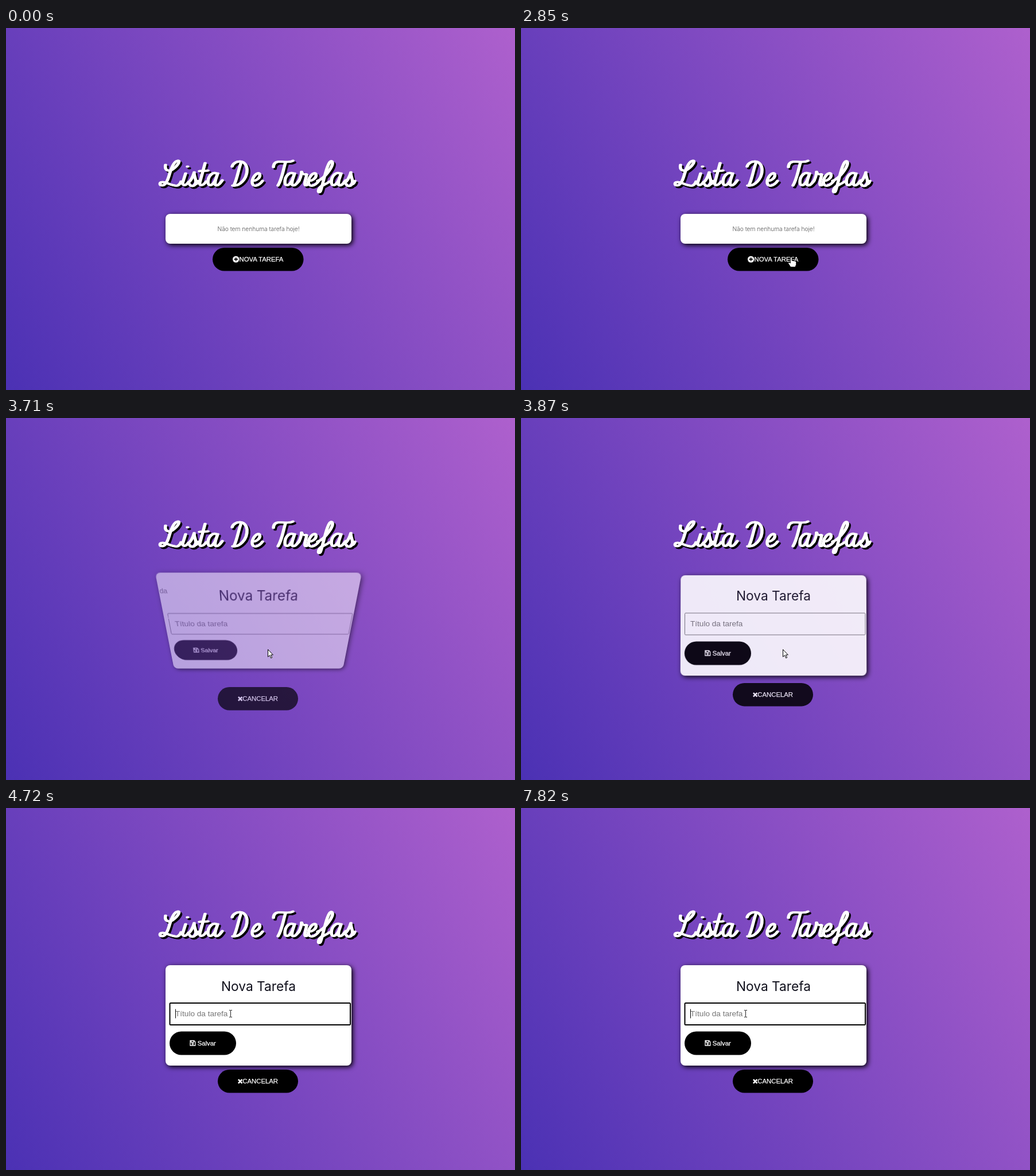
Write an HTML page that moves like this. It is 887 px wide and 631 px high and loops after 8000 ms.

```html
<!DOCTYPE html>
<html lang="pt">
<head>
<meta charset="utf-8">
<title>Lista De Tarefas</title>
<style>
html, body { margin: 0; width: 100%; height: 100%; overflow: hidden; }
body { background: linear-gradient(60deg, #4b31b4, #ae60cd); }
#stage { position: absolute; left: 0; top: 0; width: 887px; height: 631px; overflow: hidden; }
#stage > * { position: absolute; }
svg { display: block; }
.layer { left: 0; top: 0; overflow: visible; }
#title { fill: none; stroke: #fff; stroke-width: 3.6; stroke-linecap: round; stroke-linejoin: round;
  filter: drop-shadow(3.4px 3.4px 0 #000); }
.card { left: 278px; width: 324px; background: #fff; border-radius: 8px; box-shadow: 2.5px 2.5px 9px #000; }
#form { will-change: transform, opacity; }
text { font: 11.33px "Liberation Sans", Arial, sans-serif; fill: #fff; }
.label { stroke: #fff; stroke-width: .25; }
.head { font: 22.7px Inter, sans-serif; fill: #10101c; text-anchor: middle; }
.empty { font: 300 10.2px Inter, sans-serif; fill: #555; text-anchor: middle; }
.hint { font-size: 13.6px; fill: #757575; }
.line { fill: none; stroke: #fff; }
#cursor path { fill: #fff; stroke: #000; stroke-width: 1; stroke-linejoin: round; }
#cursor #ibeam { fill: none; stroke: #222; }
</style>
</head>
<body>
<div id="stage">
  <svg id="title" class="layer" width="887" height="631" role="img" aria-label="Lista De Tarefas"></svg>

  <div id="emptyCard" class="card" style="top:324px;height:52px">
    <svg width="324" height="52"><text class="empty" x="162" y="29.7">Não tem nenhuma tarefa hoje!</text></svg>
  </div>
  <svg id="add" class="layer" width="887" height="631">
    <rect x="360" y="383" width="158.5" height="40.5" rx="20.25"/>
    <circle cx="400.7" cy="403.1" r="5.7" fill="#fff"/>
    <path d="M397.5 403.1h6.4M400.7 399.9v6.4" stroke="#000" stroke-width="1.6"/>
    <text class="label" x="406.5" y="407.2">NOVA TAREFA</text>
  </svg>

  <div id="form" class="card" style="top:273.5px;height:175px">
    <svg width="324" height="175" viewBox="278 273.5 324 175">
      <text class="head" x="440" y="318">Nova Tarefa</text>
      <rect id="field" x="285.5" y="339.5" width="314.5" height="38" rx="1.5" fill="#fff"/>
      <text class="hint" x="295" y="362.4">Título da tarefa</text>
      <path id="caret" d="M295.5 350v16" stroke="#000"/>
      <rect x="285" y="389" width="116" height="41" rx="20.5"/>
      <path class="line" stroke-width="1.3" d="M321 405h6.6l2.2 2.2v6.3h-8.8zM322.6 405.2v2.9h4.4v-2.9"/>
      <circle class="line" cx="325.4" cy="410.6" r="1.3" stroke-width="1.2"/>
      <text class="label" x="333.7" y="413.2">Salvar</text>
    </svg>
  </div>
  <svg id="cancel" class="layer" width="887" height="631">
    <rect x="369" y="456" width="140" height="40.5" rx="20.25"/>
    <path class="line" stroke-width="2.6" d="M404.9 473.2l6.6 6.6m0-6.6l-6.6 6.6"/>
    <text class="label" x="412.3" y="480.2">CANCELAR</text>
  </svg>

  <svg id="cursor" class="layer" width="20" height="20">
    <path id="arrow" d="M.5.5v12.8l3-2.7 2.2 4.9 2-.9-2.2-4.7h3.9z"/>
    <path id="hand" d="M-1.5 11V1.6Q0-.6 1.5 1.6V7Q3 5.6 4.2 7.3 5.6 6.2 6.8 7.9 8.6 7.2 9 9v4.5L7.2 18H-.8L-5 11.6Q-5 9-3 9.8z"/>
    <path id="ibeam" d="M-2.5-5.5h2l.5.5.5-.5h2M0-5v11M-2.5 6.5h2L0 6l.5.5h2"/>
  </svg>
</div>
<script>
const LOOP = 8000, OPEN = 3250, FLIP = 3313, FOCUS = 4640;
const $ = id => document.getElementById(id);
const show = (id, on) => $(id).style.visibility = on ? 'visible' : 'hidden';

// Script lettering as pen strokes, baseline at y = 0
const glyphs = {
  L: 'M11-37C9-26 18-24 26-31 34-38 37-45 32-44 26-43 21-31 18-21 15-10 11-1 5-1 0-1 0-7 6-7 14-7 22 1 32-1 35-2 37-5 38-8',
  i: 'M9-22L4-6C3 0 9 0 14-7M12-34h.8',
  s: 'M0-5C5-9 9-17 11-24 10-16 16-11 13-4 11 1 5 1 3-3M13-3C15-3 17-6 18-9',
  t: 'M13-40L4-7C2 1 9 0 15-8M3-26L18-27',
  a: 'M18-21C13-27 2-19 2-7 2 2 11 0 16-13L19-22C15-12 12-1 17-1 21-1 24-6 27-10',
  D: 'M17-39C13-28 11-14 6-3M2-34C5-45 26-48 28-30 29-12 14 1 3-1',
  e: 'M3-9C11-9 18-15 16-21 13-26 4-17 3-8 2 2 13 2 21-9',
  T: 'M2-33C3-46 14-42 24-42 30-42 34-43 36-44M23-41C19-28 17-12 10-1',
  r: 'M1-8C4-14 6-19 6-25 8-18 13-22 15-20 14-13 9-1 14-1 16-1 17-4 18-7',
  f: 'M0-9C14-14 30-38 25-43 18-47 11-10 6 6 4 13 0 12 2 6 5-2 14-2 21-8'
};
const starts = [267, 304, 317, 334, 350, 392, 426, 464, 484, 509, 524, 543, 565, 590];
// Each stroke is laid side by side for a broad-nib look
$('title').innerHTML = [...'ListaDeTarefas'].map((c, i) => [-1, 0, 1].map(dx =>
  `<path transform="translate(${starts[i] + dx} 275.5)" d="${glyphs[c]}"/>`).join('')).join('');

const flip = (deg, offset, easing) =>
  ({ transform: `perspective(284px) rotateX(${deg}deg)`, offset, easing });
const timing = { delay: FLIP, duration: 1000, fill: 'backwards' };
const moves = [
  $('form').animate([
    flip(90, 0, 'ease-in'), flip(-20, .4, 'ease-in'), flip(10, .6, 'ease'), flip(-5, .8, 'ease'), flip(0, 1)
  ], timing),
  $('form').animate([
    { opacity: 0, easing: 'ease-in' }, { opacity: 1, offset: .6 }, { opacity: 1 }
  ], timing),
  $('cancel').animate([
    { opacity: 0, transform: 'translateY(40.5px)', easing: 'ease' }, { opacity: 1, transform: 'none' }
  ], timing)
];
moves.forEach(m => m.pause());

// Pointer trips as [time, x, y]; the pointer is hidden between trips
const trips = [
  [[360, 852, 626], [510, 872, 622], [660, 872, 622], [910, 833, 616], [1090, 833, 616], [1230, 617, 524], [1310, 617, 524]],
  [[2240, 340, 254], [2460, 420, 300], [2640, 490, 362], [2780, 484, 395], [2930, 456, 403],
   [4090, 456, 403], [4320, 391.5, 358], [LOOP, 391.5, 358]]
];

function pointAt(t) {
  const trip = trips.find(p => t >= p[0][0] && t < p[p.length - 1][0]);
  if (!trip) return null;
  const i = trip.findIndex(p => p[0] > t), [t0, x0, y0] = trip[i - 1], [t1, x1, y1] = trip[i];
  const k = (t - t0) / (t1 - t0);
  return [x0 + (x1 - x0) * k, y0 + (y1 - y0) * k];
}

function draw(t) {
  const open = t >= OPEN, focus = t >= FOCUS;
  $('title').style.transform = `translateY(${open ? -51 : 0}px)`;
  show('emptyCard', !open);
  show('add', !open);
  show('form', open);
  show('cancel', open);
  moves.forEach(m => m.currentTime = t);

  $('field').setAttribute('stroke', focus ? '#000' : '#767676');
  $('field').setAttribute('stroke-width', focus ? 2 : 1);
  show('caret', focus && Math.floor((t - FOCUS) / 530) % 2 === 0);

  const at = pointAt(t);
  const kind = !at ? '' : t >= 4250 ? 'ibeam' : t >= 2780 && !open ? 'hand' : 'arrow';
  for (const id of ['arrow', 'hand', 'ibeam']) show(id, id === kind);
  if (at) $('cursor').style.transform = `translate(${at[0]}px, ${at[1]}px)`;
}

const begin = performance.now();
function tick() {
  draw((performance.now() - begin) % LOOP);
  requestAnimationFrame(tick);
}
tick();
</script>
</body>
</html>
```
